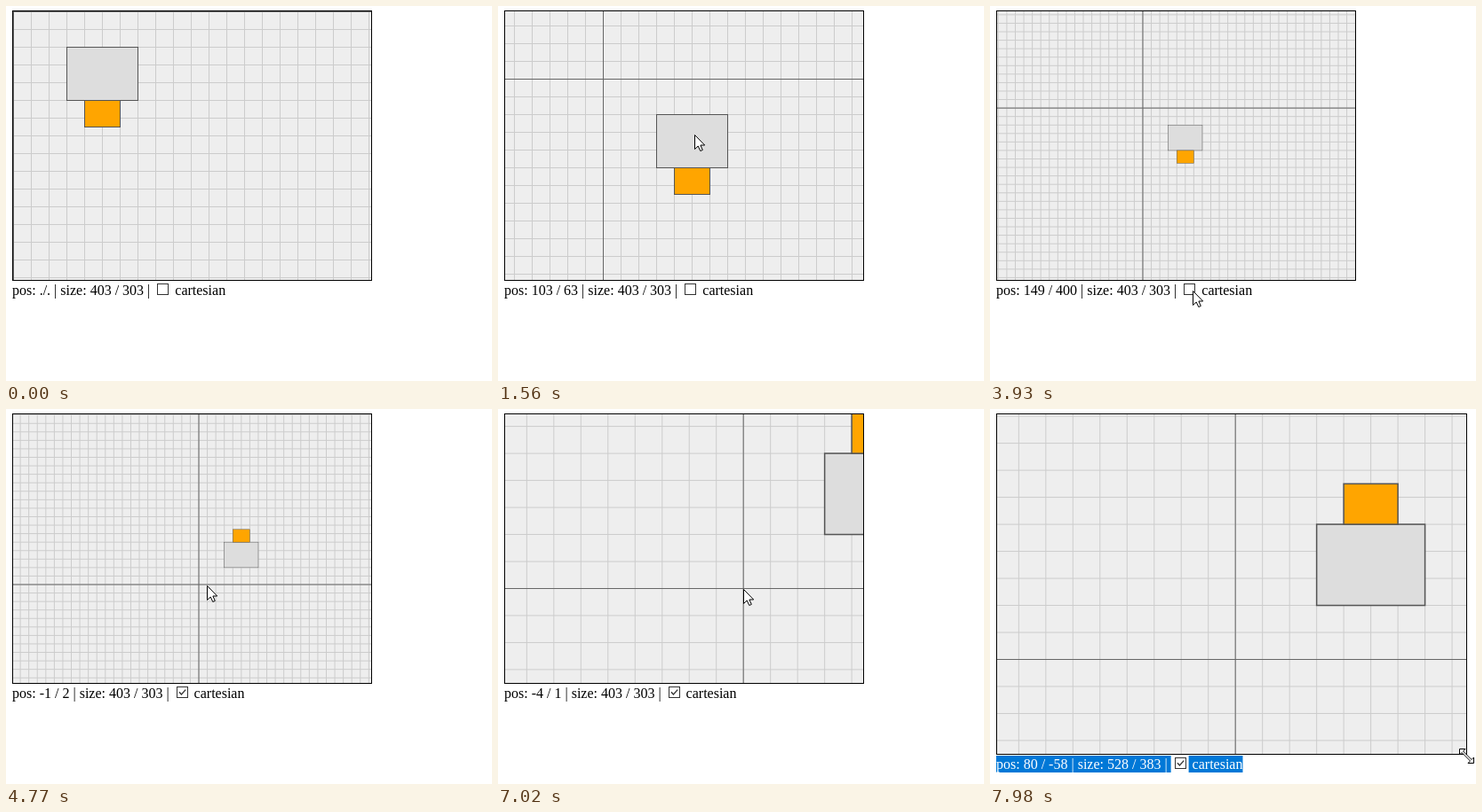
An HTML page with a canvas that plays this animation: 547x423 px, repeating every 8 s.

```html
<!DOCTYPE html>
<html lang="en">
<head>
<meta charset="utf-8">
<title>Pan, zoom and resize</title>
<style>
  html, body { margin: 0; width: 100%; height: 100%; overflow: hidden; background: #fff; }
  canvas { display: block; }
</style>
</head>
<body>
<canvas id="stage" width="547" height="423"></canvas>
<script>
const ctx = document.getElementById('stage').getContext('2d');
const LOOP = 8000, TICK = 30, LEFT = 8, TOP = 6;
const TOGGLE = 4020, RESIZE = 7380;

const ARROW = new Path2D('M.5.5V16.5L4.2 13 6.8 18.5 9.3 17.4 6.9 12H11.7Z');
const RESIZER = new Path2D('M-8-8H-1.5L-4-5.5 5.5 4 8 1.5V8H1.5L4 5.5-5.5-4-8-1.5Z');
const TICK_MARK = new Path2D('M3 6.3L5.4 8.9 10.2 3.6');

// Pointer path: time, x, y
const POINTER = [
  [330, 522, 141], [390, 498, 204], [450, 478, 273], [510, 444, 347],
  [570, 407, 373], [600, 383, 376], [660, 327, 345], [780, 245, 245],
  [930, 160, 120], [1050, 116, 72], [1080, 112.5, 76.5], [1110, 110, 76],
  [1170, 111, 69], [1260, 130, 78], [1410, 190, 125], [1530, 221, 145],
  [3390, 221, 145], [3540, 240, 220], [3690, 243, 306], [3780, 236, 327],
  [3900, 229, 326], [3930, 228, 321], [3990, 228, 321], [4080, 228, 327],
  [4320, 210, 270], [4590, 172, 200], [4620, 172, 200], [4740, 217, 198],
  [4770, 226, 199], [4980, 285, 196], [5130, 290, 200], [5430, 276.2, 202.5],
  [5460, 276, 203], [7020, 276, 203], [7230, 398, 290], [7320, 411.5, 311.5]
];

// Wheel bursts: start, notches, direction
const WHEEL = [
  [2100, 7, 1], [2370, 5, -1], [3090, 9, -1],
  [5550, 5, 1], [6150, 3, 1], [6660, 3, 1]
];

// Position readout: start, text (null follows the pointer)
const READOUT = [
  [0, './.'], [750, null], [1140, '103 / 63'], [3390, null], [3690, '149 / 400'],
  [4200, null], [4620, '-1 / 2'], [5460, '-4 / 1'], [7050, null], [7260, '80 / -58']
];

const clamp = (v, lo, hi) => Math.min(hi, Math.max(lo, v));

function pointerAt(t) {
  const next = POINTER.findIndex(key => key[0] > t);
  if (next < 1) return POINTER.at(next < 0 ? -1 : 0).slice(1);
  const [t0, x0, y0] = POINTER[next - 1], [t1, x1, y1] = POINTER[next];
  const u = (t - t0) / (t1 - t0);
  return [x0 + (x1 - x0) * u, y0 + (y1 - y0) * u];
}

function zoomAt(t) {
  const notches = WHEEL.reduce((sum, [start, count, sign]) =>
    sum + sign * clamp(Math.floor((t - start) / TICK) + 1, 0, count), 0);
  return 0.9 ** -notches;
}

function viewAt(t) {
  const u = clamp((t - RESIZE) / (LOOP - 20 - RESIZE), 0, 1);
  const dw = Math.round(125 * u ** 0.8), dh = Math.round(80 * u ** 1.2);
  const scale = zoomAt(t), flipped = t >= TOGGLE;
  // The view follows a drag one tick late and zooms around the held point.
  const [x, y] = pointerAt(flipped ? clamp(t - TICK, 4620, 5430) : clamp(t - TICK, 1170, 1530));
  return {
    dw, dh, w: 403 + dw, h: 303 + dh, scale, flipped,
    ox: flipped ? x : x - 102.5 * scale,
    oy: flipped ? y + dh : y - 62.5 * scale
  };
}

function line(x0, y0, x1, y1) {
  ctx.beginPath();
  ctx.moveTo(x0, y0);
  ctx.lineTo(x1, y1);
  ctx.stroke();
}

function drawBox(x, y, w, h, fill) {
  ctx.fillStyle = fill;
  ctx.fillRect(x, y, w, h);
  ctx.strokeRect(x, y, w, h);
}

function drawPlane({ w, h, ox, oy, scale, flipped }) {
  const right = LEFT + w, bottom = TOP + h, step = 20 * scale;
  ctx.save();
  ctx.beginPath();
  ctx.rect(LEFT, TOP, w, h);
  ctx.clip();
  ctx.fillStyle = '#eee';
  ctx.fillRect(LEFT, TOP, w, h);

  ctx.lineWidth = 1;
  ctx.strokeStyle = '#ccc';
  for (let x = ox - Math.ceil((ox - LEFT) / step) * step; x < right + 1; x += step) line(x, TOP, x, bottom);
  for (let y = oy - Math.ceil((oy - TOP) / step) * step; y < bottom + 1; y += step) line(LEFT, y, right, y);
  ctx.strokeStyle = '#666';
  line(ox, TOP, ox, bottom);
  line(LEFT, oy, right, oy);

  ctx.translate(ox, oy);
  ctx.scale(scale, flipped ? -scale : scale);
  ctx.strokeStyle = '#555';
  drawBox(60, 40, 80, 60, '#ddd');
  drawBox(80, 100, 40, 30, '#ffa500');
  ctx.restore();

  ctx.lineWidth = 1;
  ctx.strokeStyle = '#000';
  ctx.strokeRect(LEFT - 0.5, TOP - 0.5, w + 1, h + 1);
}

function readoutAt(t) {
  const text = READOUT.findLast(entry => entry[0] <= t)[1];
  if (text !== null) return text;
  const { ox, oy, scale, flipped } = viewAt(t);
  const [x, y] = pointerAt(t - TICK);
  const world = d => Math.round(d / scale) || 0;
  return `${world(x - ox)} / ${world(flipped ? oy - y : y - oy)}`;
}

function drawLabel(text, x, h, selected) {
  const width = ctx.measureText(text).width;
  if (selected) {
    ctx.fillStyle = '#0078d7';
    ctx.fillRect(x, h + 8, width, 19);
  }
  ctx.fillStyle = selected ? '#fff' : '#000';
  ctx.fillText(text, x, h + 23);
  return x + width;
}

function drawStatus(t, { w, h, flipped }) {
  const selected = t > RESIZE;
  ctx.font = '16px "Liberation Serif", serif';
  const end = drawLabel(`pos: ${readoutAt(t)} | size: ${w} / ${h} | `, 7, h, selected);
  const box = Math.round(end + 4);
  ctx.strokeStyle = '#333';
  ctx.lineWidth = 1;
  ctx.strokeRect(box + 0.5, h + 10.5, 12, 12);
  if (flipped) {
    ctx.save();
    ctx.translate(box, h + 10);
    ctx.lineWidth = 1.4;
    ctx.stroke(TICK_MARK);
    ctx.restore();
  }
  drawLabel(' cartesian', end + 20, h, selected);
}

function drawPointer(t, { dw, dh }) {
  if (t < POINTER[0][0]) return;
  const [x, y] = pointerAt(t), resizing = t >= 7320;
  ctx.save();
  if (resizing) ctx.translate(x + dw, y + dh);
  else ctx.translate(Math.round(x), Math.round(y));
  const shape = resizing ? RESIZER : ARROW;
  ctx.fillStyle = '#fff';
  ctx.strokeStyle = '#000';
  ctx.lineWidth = 1;
  ctx.fill(shape);
  ctx.stroke(shape);
  ctx.restore();
}

function draw() {
  const t = Math.floor(performance.now() % LOOP / TICK) * TICK;
  const view = viewAt(t);
  ctx.fillStyle = '#fff';
  ctx.fillRect(0, 0, 547, 423);
  drawPlane(view);
  drawStatus(t, view);
  drawPointer(t, view);
  requestAnimationFrame(draw);
}
draw();
</script>
</body>
</html>
```
